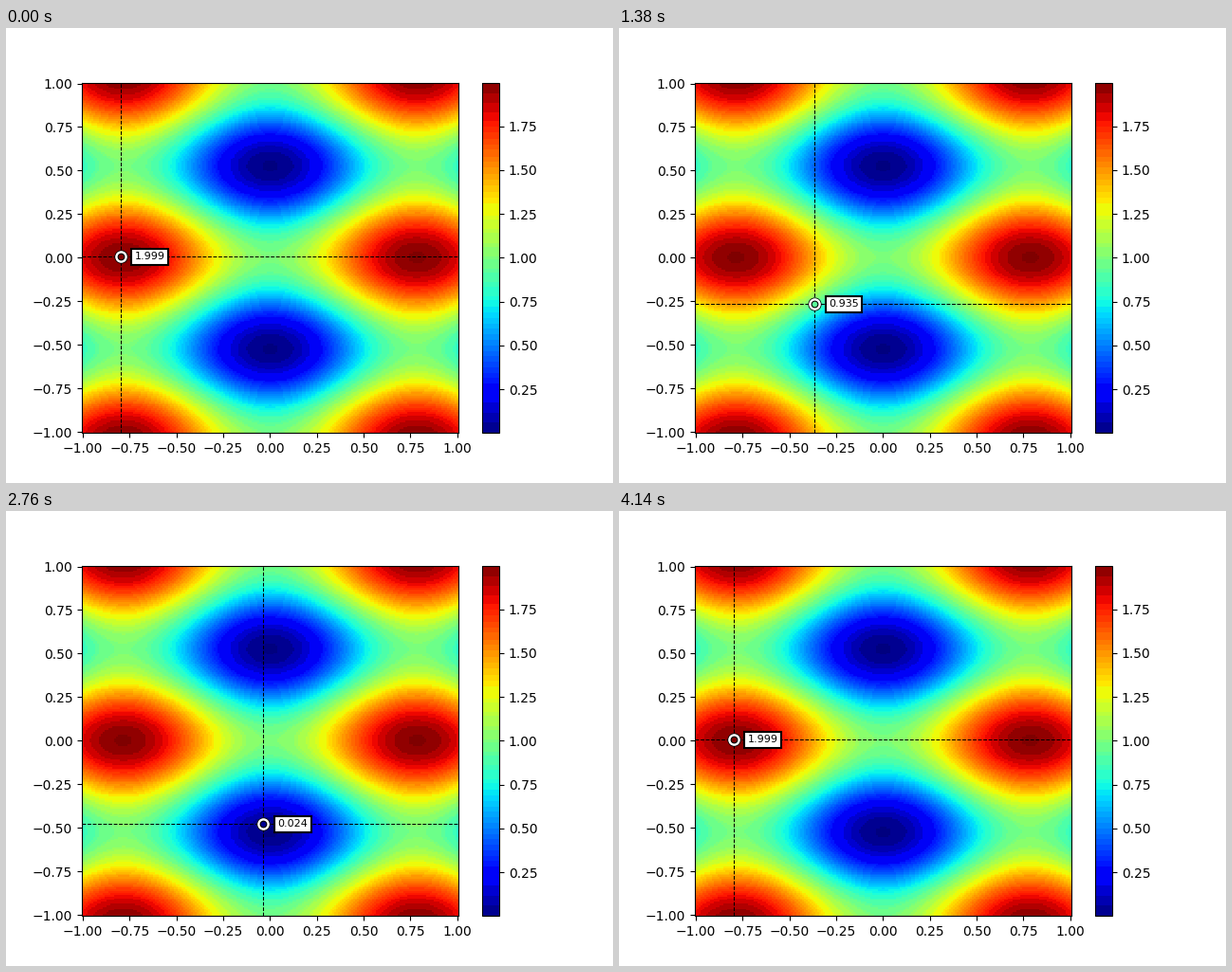
Recreate the animation shown at these times as a matplotlib script. Size 640 by 480 pixels, loop 4200 ms.

```python
import numpy as np
import matplotlib.pyplot as plt
from matplotlib.animation import FuncAnimation
from matplotlib.colors import ListedColormap

DPI = 100
PX = 72 / DPI          # points per pixel
GRID = 200
STEPS = 24             # cursor moves per trip
REST = 11              # extra frames of rest at each end
START, END = np.array([-0.8, 0.0]), np.array([0.0, -0.5])


def banded_jet():
    """Jet, with neighbouring shades merged into flat bands."""
    rgb = np.floor(plt.get_cmap("jet")(np.arange(256))[:, :3] * 255).astype(int)
    keys = rgb // [32, 16, 32]
    _, group = np.unique(keys, axis=0, return_inverse=True)
    group = np.ravel(group)
    means = np.array([rgb[group == g].mean(axis=0) for g in range(group.max() + 1)])
    return ListedColormap(means[group] / 255)


axis = np.linspace(-1, 1, GRID)
cell = axis[1] - axis[0]
edge = 1 + cell / 2
x, y = np.meshgrid(axis, axis)
field = np.sin(2 * x) ** 2 + np.cos(3 * y) ** 2

fig, ax = plt.subplots(figsize=(6.4, 4.8), dpi=DPI)
image = ax.imshow(field, cmap=banded_jet(), origin="lower", aspect="auto",
                  interpolation="nearest", extent=(-edge, edge, -edge, edge))
fig.colorbar(image, ax=ax)
ax.set_autoscale_on(False)

dash = dict(color="black", lw=0.75, ls="--")
hline = ax.axhline(0, **dash)
vline = ax.axvline(0, **dash)


def disc(radius, color):
    return ax.plot([0], [0], "o", ms=2 * radius * PX, mew=0, color=color, zorder=4)[0]


rings = [disc(7.1, "black"), disc(6.3, "white"), disc(3.9, "black"), disc(2.8, "red")]
label = ax.annotate("", (0, 0), xytext=(15, 0), textcoords="offset pixels",
                    fontsize=8, ha="left", va="center", zorder=5,
                    bbox=dict(boxstyle="square,pad=0.3", fc="white", ec="black", lw=1.5))


def cell_index(v):
    return int(np.floor((v + edge) / cell + 1e-6))


def update(n):
    step = np.clip(n - REST + 1, 0, STEPS) - np.clip(n - 2 * REST - STEPS + 1, 0, STEPS)
    target = START + (END - START) * step / STEPS
    col, row = (cell_index(v) for v in target)
    px, py, value = axis[col], axis[row], field[row, col]

    hline.set_ydata([py, py])
    vline.set_xdata([px, px])
    for ring in rings:
        ring.set_data([px], [py])
    rings[-1].set_color(image.cmap(image.norm(value)))
    label.xy = (px, py)
    label.set_text(f"{value:.3f}")
    return [hline, vline, *rings, label]


anim = FuncAnimation(fig, update, frames=2 * (STEPS + REST), interval=60,
                     repeat=True, repeat_delay=0, blit=False)
plt.show()
```
